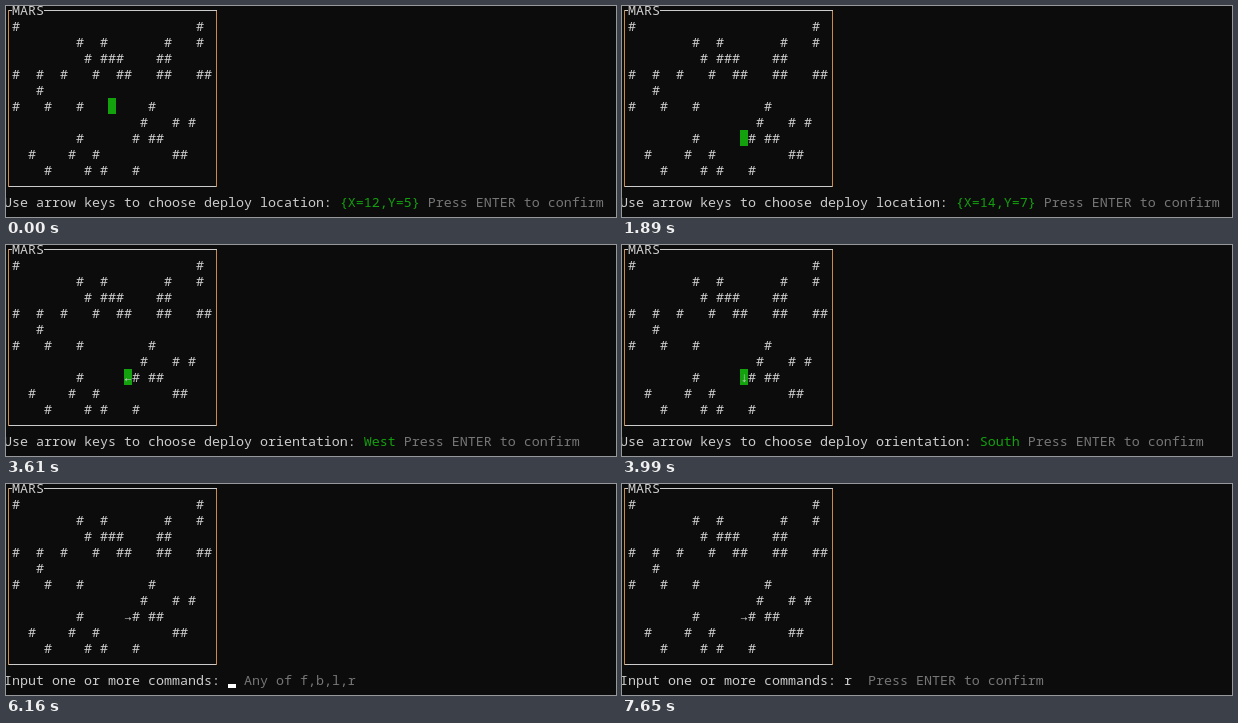
These frames come from a looping animation (610x211 px, 8000 ms). An HTML page:

```html
<!DOCTYPE html>
<html lang="en">
<head>
<meta charset="utf-8">
<title>Rover deployment console</title>
<style>
  html, body { margin: 0; width: 100%; height: 100%; overflow: hidden; background: #0c0c0c; }
  svg { display: block; width: 610px; height: 211px; }
  text { font: 13.333px "Noto Sans Mono", "DejaVu Sans Mono", monospace; fill: #ccc; white-space: pre; }
  .value { fill: #13a10e; }
  .hint { fill: #767676; }
  .block { fill: #13a10e; }
  .caret { fill: #fff; }
  .edge { fill: #ccc; }
  .side { fill: #c98a4b; }
</style>
</head>
<body>
<svg viewBox="0 0 610 211">
  <g id="map">
    <rect class="edge" x="38" y="4" width="170" height="1"/>
    <rect class="edge" x="2" y="4" width="4" height="1"/>
    <rect class="edge" x="2" y="180" width="209" height="1"/>
    <rect class="side" x="2" y="4" width="1" height="177"/>
    <rect class="side" x="210" y="4" width="1" height="177"/>
    <rect class="edge" x="208" y="4" width="3" height="1"/>
    <text x="6" y="9">MARS</text>
  </g>
  <rect id="block" class="block" width="8" height="16"/>
  <text id="rover"></text>
  <text id="prompt" x="-2" y="201"><tspan></tspan><tspan class="value"></tspan><tspan class="hint"></tspan></text>
  <rect id="caret" class="caret" y="200" width="8" height="4"/>
</svg>
<script>
const LOOP = 8000, CELL_W = 8, CELL_H = 16;
const CONFIRM = "Press ENTER to confirm";
const colX = col => col * CELL_W - 2;
const rowY = row => row * CELL_H + 12;
const byId = id => document.getElementById(id);

const terrain = [
  "#                      #",
  "        #  #       #   #",
  "         # ###    ##",
  "#  #  #   #  ##   ##   ##",
  "   #",
  "#   #   #        #",
  "                #   # #",
  "        #      # ##",
  "  #    #  #         ##",
  "    #    # #   #"
];

terrain.forEach((line, row) => {
  const text = document.createElementNS("http://www.w3.org/2000/svg", "text");
  text.setAttribute("x", colX(1));
  text.setAttribute("y", rowY(row) + 13);
  text.textContent = line;
  byId("map").append(text);
});

const locate = (at, x, y) => ({
  at, x, y, block: true, glyph: "",
  prompt: ["Use arrow keys to choose deploy location: ", `{X=${x},Y=${y}}`, " " + CONFIRM]
});
const orient = (at, name, glyph) => ({
  at, x: 14, y: 7, block: true, glyph,
  prompt: ["Use arrow keys to choose deploy orientation: ", name, " " + CONFIRM]
});
const command = (at, typed, hint, caretOn) => ({
  at, x: 14, y: 7, block: false, glyph: "→",
  prompt: ["Input one or more commands: " + typed, "", "  " + hint],
  caret: caretOn ? 28 + typed.length : null
});

const HELP = "Any of f,b,l,r";
const states = [
  locate(0, 12, 5),
  locate(500, 12, 6),
  locate(880, 12, 7),
  locate(1660, 13, 7),
  locate(1890, 14, 7),
  orient(2670, "North", "↑"),
  orient(3510, "West", "←"),
  orient(3990, "South", "↓"),
  orient(4600, "East", "→"),
  command(6160, "", HELP, true),
  command(6620, "", HELP, false),
  command(7100, "", HELP, true),
  command(7500, "r", CONFIRM, true),
  command(7650, "r", CONFIRM, false)
];

const block = byId("block"), rover = byId("rover"), caret = byId("caret");
const spans = byId("prompt").children;

function show(state) {
  block.setAttribute("x", colX(state.x + 1));
  block.setAttribute("y", rowY(state.y));
  block.style.visibility = state.block ? "visible" : "hidden";
  rover.setAttribute("x", colX(state.x + 1));
  rover.setAttribute("y", rowY(state.y) + 13);
  rover.textContent = state.glyph;
  state.prompt.forEach((part, i) => { spans[i].textContent = part; });
  const caretOn = state.caret != null;
  caret.style.visibility = caretOn ? "visible" : "hidden";
  if (caretOn) caret.setAttribute("x", colX(state.caret));
}

let current;
const start = performance.now();
function tick(now) {
  const t = Math.max(0, now - start) % LOOP;
  const next = states.findLast(state => state.at <= t);
  if (next !== current) show(current = next);
  requestAnimationFrame(tick);
}
tick(start);
</script>
</body>
</html>
```
